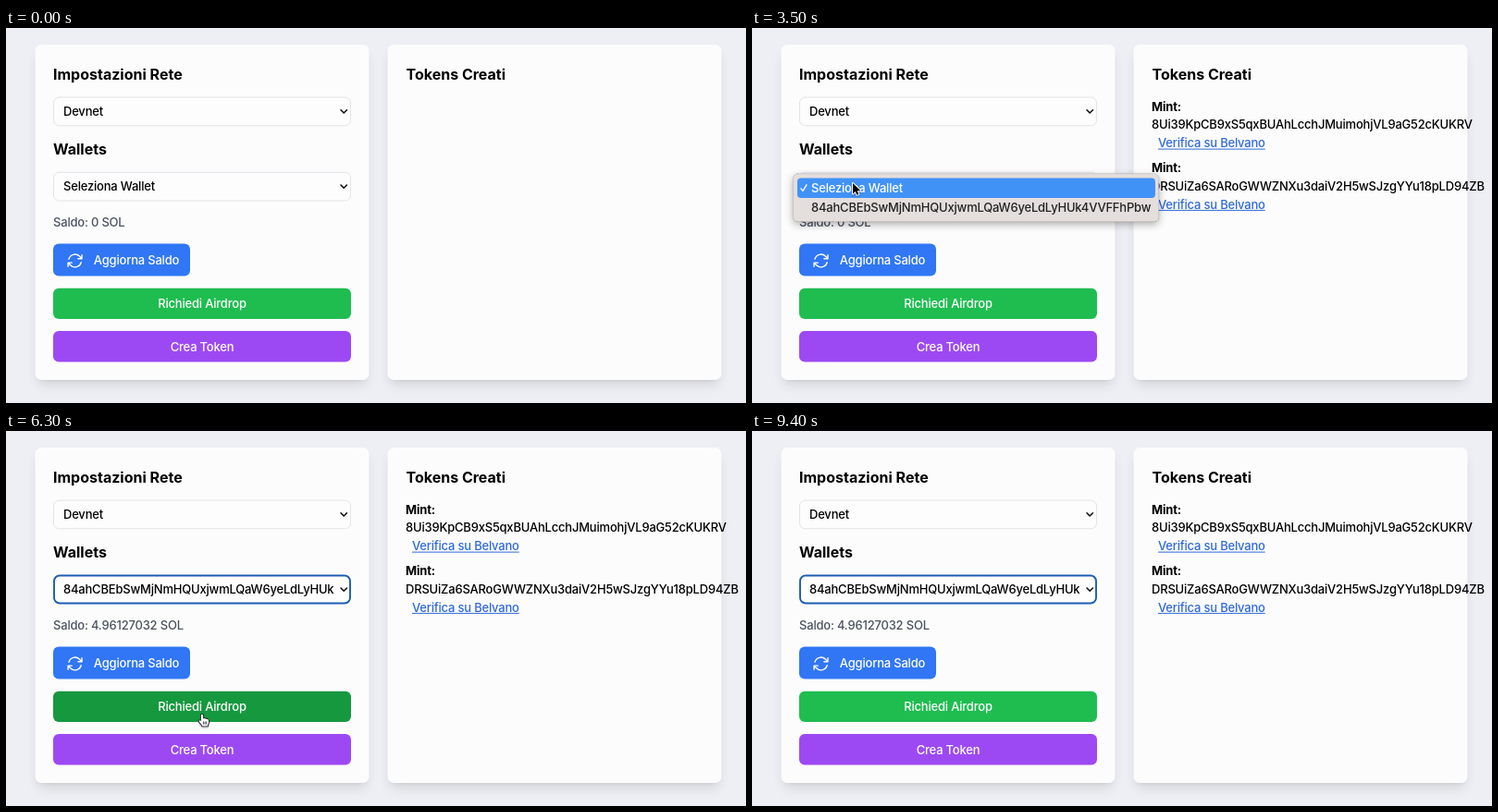
These frames come from a looping animation (800x406 px, 9500 ms). An HTML page with a canvas:

```html
<!DOCTYPE html>
<html lang="it">
<head>
<meta charset="utf-8">
<title>Tokens Creati</title>
<style>
  html, body { margin: 0; width: 100%; height: 100%; overflow: hidden; background: #eeeff4; }
  canvas { display: block; width: 800px; height: 406px; }
</style>
</head>
<body>
<canvas id="stage" width="800" height="406"></canvas>
<script>
const page = document.getElementById('stage').getContext('2d');
const layer = new OffscreenCanvas(800, 406).getContext('2d');
let ctx = page;
const LOOP = 9500, STEP = 100;
const WALLET = '84ahCBEbSwMjNmHQUxjwmLQaW6yeLdLyHUk4VVFFhPbw';
const MINTS = [
  '8Ui39KpCB9xS5qxBUAhLcchJMuimohjVL9aG52cKUKRV',
  'DRSUiZa6SARoGWWZNXu3daiV2H5wSJzgYYu18pLD94ZB'
];
const AT = {
  tokens: 900, cursorIn: 1500, menuOpen: 3200, menuFade: 4400,
  menuGone: 4600, balance: 5000, cursorOut: 8700
};
// time, x, y of the pointer tip
const PATH = [
  [1500, 10, 14], [1700, 10, 14], [1800, 52, 28], [2800, 112, 94],
  [3100, 109, 168], [3700, 109, 168], [4100, 106, 198], [4700, 106, 198],
  [5300, 132, 247], [5700, 132, 247], [6200, 212, 307], [6800, 212, 307],
  [7400, 240, 352], [7800, 240, 352], [8100, 244, 346], [8200, 244, 346],
  [8600, 592, 102], [8700, 592, 102]
];
const BUTTONS = [
  { x: 51, y: 233.6, w: 148, h: 35, fill: '#3076f5', hover: '#2563eb' },
  { x: 51, y: 281.7, w: 322, h: 33.4, fill: '#1fbd50', hover: '#16983f', label: 'Richiedi Airdrop', base: 303.2 },
  { x: 51, y: 328, w: 322, h: 33.4, fill: '#9d49f3', hover: '#8729e4', label: 'Crea Token', base: 349.6 }
];
const REFRESH = new Path2D('M16.023 9.348h4.992M2.985 19.644v-4.992h4.992m-4.993 0l3.181 3.183a8.25 8.25 0 0013.803-3.7M4.031 9.865a8.25 8.25 0 0113.803-3.7l3.181 3.182m0-4.991v4.99');
const ARROW = new Path2D('M0 0V11.4L2.7 8.9 4.4 12.8 6.4 11.9 4.7 8.2H8.3Z');
const HAND = new Path2D('M-1.3 1.2C-1.3 -.6 1.2 -.6 1.3 1.2V5C1.7 4 3.5 4.1 3.6 5.4 4.1 4.6 5.7 4.8 5.8 6 6.5 5.3 7.8 5.8 7.8 7V9.5C7.8 11 6.8 12 6.6 14H.3C-.1 12.4 -2.2 10.8 -3.5 8.7 -4.4 7.2 -2.8 6.3 -1.3 8Z');

function box(x, y, w, h, r, fill, stroke, width = 1) {
  ctx.beginPath();
  ctx.roundRect(x, y, w, h, r);
  if (fill) { ctx.fillStyle = fill; ctx.fill(); }
  if (stroke) { ctx.strokeStyle = stroke; ctx.lineWidth = width; ctx.stroke(); }
}

function text(str, x, y, { color = '#000', size = 13, weight = 450, align = 'left', spacing = -.2 } = {}) {
  ctx.font = `${weight} ${size}px Inter, sans-serif`;
  ctx.letterSpacing = `${spacing}px`;
  ctx.textAlign = align;
  ctx.fillStyle = color;
  ctx.fillText(str, x, y);
  return ctx.measureText(str).width;
}

const heading = (str, x, y) => text(str, x, y, { size: 16, weight: 700, spacing: 0 });

function line(points, color, width) {
  ctx.beginPath();
  points.forEach(([x, y]) => ctx.lineTo(x, y));
  ctx.strokeStyle = color;
  ctx.lineWidth = width;
  ctx.lineCap = ctx.lineJoin = 'round';
  ctx.stroke();
}

function shadow(color, blur, dy) {
  ctx.shadowColor = color;
  ctx.shadowBlur = blur;
  ctx.shadowOffsetY = dy;
}

function card(x) {
  ctx.save();
  shadow('rgba(0,0,0,.11)', 12.5, 8);
  box(x + 2.5, 20.5, 356, 358, 6, '#fcfcfc');
  shadow('rgba(0,0,0,.09)', 5, 3);
  box(x + 3, 21, 355, 357, 6, '#fcfcfc');
  ctx.restore();
  box(x, 18, 361, 363, 6.5, '#fcfcfc');
}

function select(label, y, focused) {
  if (focused) box(52, y + .5, 320, 30, 6, '#fff', '#1c5cb4', 1.9);
  else box(51.5, y + .2, 321, 30.8, 6, '#fdfdfd', '#e3e4e9');
  text(label, 62, y + 20.3);
  line([[362, y + 14], [365.2, y + 17.2], [368.4, y + 14]], '#111', 1.6);
}

function pointer(t) {
  if (t < AT.cursorIn || t >= AT.cursorOut) return null;
  const i = PATH.findIndex(p => p[0] > t);
  const [t0, x0, y0] = PATH[i - 1], [t1, x1, y1] = PATH[i];
  const u = (t - t0) / (t1 - t0), e = u * u * (3 - 2 * u);
  return { x: x0 + (x1 - x0) * e, y: y0 + (y1 - y0) * e };
}

const inside = (p, b) => p && p.x >= b.x && p.x <= b.x + b.w && p.y >= b.y && p.y <= b.y + b.h;

function drawButtons(p) {
  for (const b of BUTTONS) {
    box(b.x, b.y, b.w, b.h, 6, inside(p, b) ? b.hover : b.fill);
    if (b.label) text(b.label, b.x + b.w / 2, b.base, { color: '#fff', align: 'center' });
  }
  text('Aggiorna Saldo', 94.8, 255.5, { color: '#fff' });
  ctx.save();
  ctx.translate(64.6, 242);
  ctx.scale(.83, .83);
  ctx.strokeStyle = '#fff';
  ctx.lineWidth = 1.7;
  ctx.lineCap = ctx.lineJoin = 'round';
  ctx.stroke(REFRESH);
  ctx.restore();
}

function drawTokens() {
  MINTS.forEach((mint, i) => {
    const y = 89.6 + i * 66.3;
    text('Mint:', 432, y, { weight: 700 });
    text(mint, 432, y + 19.8);
    const w = text('Verifica su Belvano', 439, y + 39.7, { color: '#2f69d9' });
    ctx.fillRect(439, y + 41, w, 1);
  });
}

function drawMenu(p) {
  const second = p.y > 184;
  ctx.save();
  shadow('rgba(0,0,0,.3)', 9, 3);
  box(44.3, 157.7, 395.5, 52, 5, '#e4dedd');
  ctx.restore();
  box(44.3, 157.7, 395.5, 52, 5, null, 'rgba(0,0,0,.16)', .8);
  box(49, second ? 184.2 : 162.6, 387, 21.5, 4, '#4192f7');
  const first = second ? '#222' : '#fff';
  line([[53, 173.8], [55, 176.3], [59, 169.8]], first, 1.3);
  text('Seleziona Wallet', 64, 177.6, { color: first });
  text(WALLET, 64, 199.2, { color: second ? '#fff' : '#222' });
}

// The menu fades as one piece, so it is composed on its own layer.
function fadeMenu(t, p) {
  if (t < AT.menuOpen || t >= AT.menuGone) return;
  layer.clearRect(0, 0, 800, 406);
  ctx = layer;
  drawMenu(p);
  ctx = page;
  ctx.globalAlpha = Math.min(1, (AT.menuGone - t) / (AT.menuGone - AT.menuFade));
  ctx.drawImage(layer.canvas, 0, 0);
  ctx.globalAlpha = 1;
}

function drawPointer(p) {
  if (!p) return;
  const hand = BUTTONS.some(b => inside(p, b));
  const shape = hand ? HAND : ARROW;
  ctx.save();
  ctx.translate(p.x, p.y);
  if (hand) ctx.scale(.9, .9);
  ctx.lineJoin = 'round';
  shadow('rgba(0,0,0,.35)', 2, 1);
  ctx.strokeStyle = hand ? '#111' : '#fff';
  ctx.lineWidth = hand ? 1.7 : 2;
  ctx.stroke(shape);
  shadow('transparent', 0, 0);
  ctx.fillStyle = hand ? '#fff' : '#000';
  ctx.fill(shape);
  if (hand) for (const x of [1.6, 3.4, 5.2]) line([[x, 8.6], [x, 11.4]], '#111', .8);
  ctx.restore();
}

function draw(t) {
  const p = pointer(t);
  const chosen = t >= AT.menuGone;
  ctx.fillStyle = '#eeeff4';
  ctx.fillRect(0, 0, 800, 406);
  card(31.5);
  card(412.5);
  heading('Impostazioni Rete', 51, 55.6);
  select('Devnet', 74.8, false);
  heading('Wallets', 51, 136.8);
  select(chosen ? WALLET.slice(0, 35) : 'Seleziona Wallet', 156, chosen);
  text(`Saldo: ${t >= AT.balance ? '4.96127032' : '0'} SOL`, 51, 215.4, { color: '#4b5260' });
  drawButtons(p);
  heading('Tokens Creati', 432.5, 55.6);
  if (t >= AT.tokens) drawTokens();
  fadeMenu(t, p);
  drawPointer(p);
}

function tick() {
  const t = performance.now() % LOOP;
  draw(Math.floor(t / STEP) * STEP);
  requestAnimationFrame(tick);
}
tick();
</script>
</body>
</html>
```
